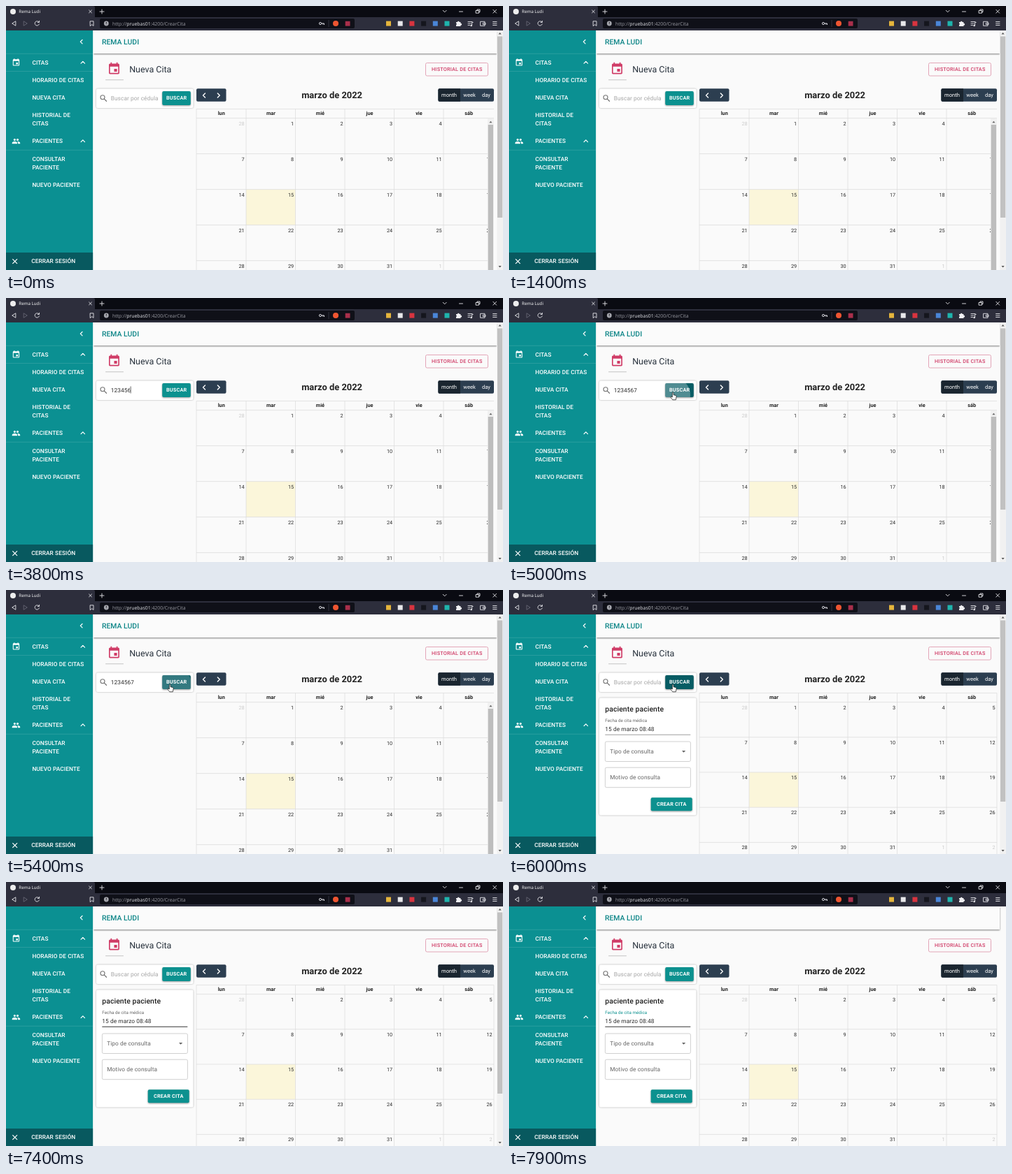
Recreate the animation shown at these times as an HTML page. Size 710 by 378 pixels, loop 8 s.

```html
<!DOCTYPE html>
<html lang="es">
<head>
<meta charset="utf-8">
<title>Rema Ludi</title>
<style>
html, body { margin: 0; width: 100%; height: 100%; overflow: hidden; background: #fafafa; }
svg { display: block; width: 100%; height: 100%; }
text { font-family: Roboto, sans-serif; text-rendering: geometricPrecision; white-space: pre; }
.body { font-size: 8.32px; letter-spacing: .078px; }
.btn { font-size: 7.28px; font-weight: 500; letter-spacing: .208px; }
.ui { font-family: "Open Sans", sans-serif; }
.tool { font-size: 7.6px; fill: #fff; text-anchor: middle; }
.head { font-size: 7.28px; font-weight: 700; fill: #222; text-anchor: middle; }
.num { font-size: 7.28px; fill: #2b2b2b; text-anchor: end; }
.other { fill: #cbcbcb; }
.line { fill: none; stroke-linecap: round; stroke-linejoin: round; }
.paper { fill: #fff; filter: drop-shadow(0 .8px .9px rgba(0,0,0,.32)); }
.raised { filter: drop-shadow(0 1px .9px rgba(0,0,0,.4)); }
#menu text { font-weight: 500; }

.anim { animation: 8s step-end infinite; }
#old { animation-name: before; }
#fresh, #card { animation-name: after; }
#hint { animation-name: hint; }
.typed { animation-name: typed; }
#pen { animation-name: pen; }
#caret { animation-name: caret; }
#search { animation-name: hover; animation-timing-function: linear; }
#ripple { animation-name: ripple; animation-timing-function: linear; transform-origin: 234px 139px; }
#hand { animation-name: hand; animation-timing-function: linear; }
#arrow { animation-name: arrow; animation-timing-function: linear; }
#rule { animation-name: rule; }
#label { animation-name: label; }
#scroll { animation-name: lock; }

@keyframes before { 0% { opacity: 1 } 68.75%, 100% { opacity: 0 } }
@keyframes after { 0% { opacity: 0 } 68.75%, 100% { opacity: 1 } }
@keyframes hint { 0% { opacity: 1 } 26.25% { opacity: 0 } 68.75%, 100% { opacity: 1 } }
@keyframes typed { 0% { opacity: 0 } 26.25% { opacity: 1 } 68.75%, 100% { opacity: 0 } }
@keyframes pen {
  0% { transform: translateX(0) }
  26.25% { transform: translateX(4.75px) }
  31.25% { transform: translateX(9.5px) }
  35% { transform: translateX(14.25px) }
  38.75% { transform: translateX(19px) }
  42.5% { transform: translateX(23.75px) }
  46.25% { transform: translateX(28.5px) }
  50%, 100% { transform: translateX(33.25px) }
}
@keyframes caret {
  0% { opacity: 0 } 18.75% { opacity: 1 } 25.4% { opacity: 0 }
  26.25% { opacity: 1 } 56.6%, 100% { opacity: 0 }
}
@keyframes hover { 0%, 58% { fill: #0c918f } 60.5%, 78% { fill: #075c64 } 81%, 100% { fill: #0c918f } }
@keyframes ripple {
  0%, 59% { transform: scale(0); opacity: .3; animation-timing-function: cubic-bezier(.4,0,.2,1) }
  65.9% { transform: scale(1); opacity: .3 }
  70%, 100% { transform: scale(1); opacity: 0 }
}
@keyframes hand {
  0%, 58.1% { opacity: 0; transform: translate(-9px,-4px) }
  58.12% { opacity: 1; transform: translate(-9px,-4px) }
  60.5%, 77.5% { opacity: 1; transform: none }
  78.1% { opacity: 1; transform: translate(-1px,5px) }
  78.12%, 100% { opacity: 0; transform: translate(-1px,5px) }
}
@keyframes arrow {
  0%, 78.1% { opacity: 0; transform: none }
  78.12% { opacity: 1; transform: none }
  81.2% { opacity: 1; transform: translate(-30px,50px) }
  81.22%, 100% { opacity: 0; transform: translate(-30px,50px) }
}
@keyframes rule { 0% { fill: #949494 } 81.25%, 100% { fill: #212121 } }
@keyframes label { 0% { fill: #666 } 97.5%, 100% { fill: #0c918f } }
@keyframes lock { 0% { opacity: 1 } 97.5%, 100% { opacity: 0 } }
</style>
</head>
<body>
<svg viewBox="0 0 710 378" preserveAspectRatio="none">
  <defs>
    <path id="event" d="M17 12h-5v5h5v-5zM16 1v2H8V1H6v2H5c-1.11 0-1.99.9-1.99 2L3 19c0 1.1.89 2 2 2h14c1.1 0 2-.9 2-2V5c0-1.1-.9-2-2-2h-1V1h-2zm3 18H5V8h14v11z"/>
    <path id="up" class="line" d="M-2.7 1.4L0-1.4L2.7 1.4" stroke="#fff" stroke-width="1.2"/>
    <clipPath id="inBtn"><rect x="223.2" y="122" width="40.6" height="20" rx="2"/></clipPath>
    <clipPath id="inBody"><rect x="271" y="147" width="417" height="231"/></clipPath>
  </defs>
  <rect width="710" height="378" fill="#fafafa"/>

  <!-- page heading -->
  <rect x="142" y="105.3" width="26" height="1" rx=".5" fill="#c4c4c4"/>
  <use href="#event" transform="translate(144.5 80) scale(.83)" fill="#d03c67"/>
  <text x="176.2" y="95.1" font-size="12.47" fill="#27313c">Nueva Cita</text>
  <rect x="599.5" y="81.5" width="89" height="18.5" rx="2" fill="none" stroke="#e3a6b8"/>
  <text class="btn" x="608" y="93.1" fill="#d03c67">HISTORIAL DE CITAS</text>

  <!-- patient search -->
  <rect class="paper" x="129" y="118.5" width="138.5" height="27.5" rx="2"/>
  <path class="line" d="M140.6 133.4L143.5 136.3" stroke="#757575" stroke-width="1.3"/>
  <circle cx="138" cy="130.8" r="3" fill="none" stroke="#757575" stroke-width="1.1"/>
  <text id="hint" class="body anim" x="149.7" y="134.5" fill="#a6a6a6">Buscar por cédula</text>
  <text class="body typed anim" x="149.7" y="134.5" fill="#2b2b2b">1234567</text>
  <g id="pen" class="anim">
    <rect class="typed anim" x="149.6" y="126" width="38" height="12" fill="#fff"/>
    <rect id="caret" class="anim" x="149.4" y="126.5" width=".7" height="10" fill="#222"/>
  </g>
  <rect id="search" class="raised anim" x="223.2" y="122" width="40.6" height="20" rx="2"/>
  <g clip-path="url(#inBtn)"><circle id="ripple" class="anim" cx="234" cy="139" r="32" fill="#fff"/></g>
  <text class="btn" x="229" y="134" fill="#fff" style="font-weight:700">BUSCAR</text>

  <!-- calendar -->
  <rect x="272" y="118.2" width="42.5" height="18.5" rx="2" fill="#2c3e50"/>
  <path class="line" d="M284.5 125L281.5 128L284.5 131M302.3 125L305.3 128L302.3 131" stroke="#fff" stroke-width="1.4"/>
  <text x="465.6" y="131.9" font-size="12.9" font-weight="700" fill="#222" text-anchor="middle">marzo de 2022</text>
  <rect x="617.4" y="118.2" width="79.6" height="18.5" rx="2" fill="#2c3e50"/>
  <path d="M619.4 118.2H649V136.7H619.4Q617.4 136.7 617.4 134.7V120.2Q617.4 118.2 619.4 118.2" fill="#1a252f"/>
  <text class="tool" x="633" y="130.1">month</text>
  <text class="tool" x="662" y="130.1">week</text>
  <text class="tool" x="686" y="130.1">day</text>
  <g id="heads"></g>
  <g id="old" class="anim">
    <g id="tall" clip-path="url(#inBody)"></g>
    <rect x="688" y="161" width="9" height="217" fill="#f1f1f1"/>
    <rect x="688.7" y="170" width="7.3" height="208" fill="#bdbdbd"/>
    <path d="M690.3 167.3L692.4 164.8L694.5 167.3Z" fill="#666"/>
  </g>
  <g id="fresh" class="anim"></g>

  <!-- appointment form -->
  <g id="card" class="anim">
    <rect class="paper" x="129" y="154.5" width="138.5" height="168" rx="2"/>
    <text x="137.3" y="174.2" font-size="10.4" font-weight="500" letter-spacing=".078" fill="#222">paciente paciente</text>
    <text id="label" class="anim" x="137.3" y="189" font-size="6.24" letter-spacing=".05">Fecha de cita médica</text>
    <text class="body" x="137.3" y="202.1" fill="#2b2b2b">15 de marzo 08:48</text>
    <rect id="rule" class="anim" x="137.3" y="206.8" width="122" height=".9"/>
    <g fill="none" stroke="#c4c4c4" stroke-width=".8">
      <rect x="137.4" y="217" width="122" height="28.5" rx="2"/>
      <rect x="137.4" y="254.2" width="122" height="28.5" rx="2"/>
    </g>
    <text class="body" x="144.2" y="233.9" fill="#666">Tipo de consulta</text>
    <path d="M247 230L252.2 230L249.6 232.7Z" fill="#666"/>
    <text class="body" x="144.2" y="271.1" fill="#666">Motivo de consulta</text>
    <rect class="raised" x="202.7" y="297.3" width="59" height="19" rx="2" fill="#0c918f"/>
    <text class="btn" x="211" y="309" fill="#fff" style="font-weight:700">CREAR CITA</text>
  </g>

  <!-- app bar, page scrollbar -->
  <rect x="125" y="35" width="576" height="33" fill="#fbfbfb" style="filter:drop-shadow(0 1px 1.3px rgba(0,0,0,.5))"/>
  <text x="137" y="55" font-size="10.4" font-weight="500" fill="#0c8587">REMA LUDI</text>
  <g id="scroll" class="anim">
    <rect x="701.3" y="35" width="9" height="343" fill="#f1f1f1"/>
    <rect x="702" y="43.5" width="7.2" height="259.5" fill="#c1c1c1"/>
    <path d="M703.5 40.5L705.6 38L707.7 40.5ZM703.5 372L705.6 374.5L707.7 372Z" fill="#555"/>
  </g>

  <!-- sidebar -->
  <rect x="124" y="35" width="1.2" height="343" fill="#f4f6f6"/>
  <rect y="35" width="124.1" height="343" fill="#0b9092"/>
  <path d="M0 68.3H124M0 93.5H124M0 206.3H124" stroke="#fff" stroke-opacity=".17" stroke-width=".7"/>
  <rect y="353" width="124.1" height="25" fill="#08595f"/>
  <path class="line" d="M109 48.5L106.3 51.2L109 53.9M9.7 362.7L15.7 368.7M15.7 362.7L9.7 368.7" stroke="#fff" stroke-width="1.2"/>
  <use href="#event" transform="translate(8.2 74.7) scale(.52)" fill="#fff"/>
  <path transform="translate(8.2 187.3) scale(.52)" fill="#fff" d="M16 11c1.66 0 2.99-1.34 2.99-3S17.66 5 16 5s-3 1.34-3 3 1.34 3 3 3zm-8 0c1.66 0 2.99-1.34 2.99-3S9.66 5 8 5 5 6.34 5 8s1.34 3 3 3zm0 2c-2.33 0-7 1.17-7 3.5V19h14v-2.5c0-2.33-4.67-3.5-7-3.5zm8 0c-.29 0-.62.02-.97.05 1.16.84 1.97 1.97 1.97 3.45V19h6v-2.5c0-2.33-4.67-3.5-7-3.5z"/>
  <use href="#up" x="109.8" y="80.8"/>
  <use href="#up" x="109.8" y="193.2"/>
  <g id="menu" fill="#fff"></g>

  <!-- browser -->
  <rect width="710" height="16" fill="#0a0b12"/>
  <path d="M0 0H125Q127 0 127 2V16H0Z" fill="#2d2e3c"/>
  <rect y="16" width="710" height="19" fill="#2d2e3c"/>
  <circle cx="10" cy="8" r="4" fill="#eee"/>
  <text class="ui" x="18.3" y="10" font-size="6.24" fill="#fff">Rema Ludi</text>
  <g class="line" stroke="#e6e6ea" stroke-width=".9">
    <path d="M118.6 6L122.4 9.8M122.4 6L118.6 9.8M134 8H140M137 5V11"/>
    <path d="M624.2 6.3L626.7 8.8L629.2 6.3M647.5 8H652.5M671.5 6.5H675.5V10.2H671.5ZM673 6.5V5H677V8.7H675.5M695.8 5.3L700.6 10.1M700.6 5.3L695.8 10.1"/>
    <path d="M13.5 22L8.7 25L13.5 28Z"/>
    <path d="M25.5 22L30.3 25L25.5 28Z" stroke="#666774"/>
    <path d="M47 23A3.2 3.2 0 1 0 47.4 26M47.5 21.3V23.4H45.2"/>
    <path d="M120.5 21.8H125V28.4L122.7 26.6L120.5 28.4Z"/>
  </g>
  <rect x="134" y="18" width="364" height="14" rx="2" fill="#0f1018"/>
  <circle cx="143.3" cy="25" r="3.4" fill="#a5a6ad"/>
  <path d="M143.3 23V25.3M143.3 26.7V27" stroke="#0c0d14" stroke-width=".9"/>
  <text class="ui" x="152" y="27.5" font-size="6.9" fill="#9a9ba3">http://<tspan fill="#e4e5ea">pruebas01</tspan>:4200/CrearCita</text>
  <path class="line" d="M450.3 25H454.5V26.6M452.8 25V26.2" stroke="#d0d0d6"/>
  <circle cx="449" cy="25" r="1.6" fill="none" stroke="#d0d0d6"/>
  <path d="M461 20V30" stroke="#3c3d49" stroke-width=".8"/>
  <circle cx="471" cy="25" r="4" fill="#ee5531"/>
  <rect x="484.7" y="21.8" width="6.8" height="6.8" fill="#a92f4b"/>
  <g id="addons"></g>
  <path d="M643 23H645A1.3 1.3 0 1 1 647.6 23H649.5V25A1.3 1.3 0 1 1 649.5 27.5V29H643V27A1.3 1.3 0 0 0 643 24.6Z" fill="#f0f0f3"/>
  <path class="line" d="M660 22.5H666M660 25H664M660 27.5H662.5M665.6 28V23.5H667.2M678 22.3H684V28.3H678ZM681.7 24.3H685V26.5H681.7ZM695.6 22.5H701M695.6 25H701M695.6 27.5H701" stroke="#e6e6ea" stroke-width=".9"/>
  <circle cx="664.6" cy="28" r="1.2" fill="#e6e6ea"/>

  <!-- pointers -->
  <path id="hand" class="anim" d="M233.3 135.5Q234.2 134.3 235 135.5V138.7L238.2 139.5Q239.3 139.9 239.1 141.2L238.3 145.8H233.8L231.1 142.3Q230.6 141 231.8 141L233.3 142Z" fill="#fff" stroke="#111" stroke-width=".7"/>
  <path id="arrow" class="anim" d="M232 142V151.5L234.2 149.5L235.7 152.8L237.1 152.2L235.7 149H238.7Z" fill="#fff" stroke="#111" stroke-width=".6"/>
</svg>
<script>
const NS = "http://www.w3.org/2000/svg";
const cols = [272, 343, 413.5, 484, 554.5, 625, 697];
const top0 = 160.6;

function add(parent, tag, attrs, label) {
  const el = document.createElementNS(NS, tag);
  for (const k in attrs) el.setAttribute(k, attrs[k]);
  if (label) el.textContent = label;
  document.getElementById(parent).append(el);
}

function month(id, step) {
  add(id, "rect", { x: cols[1], y: top0 + 2 * step, width: 70.5, height: step, fill: "#fbf6da" });
  let grid = "";
  for (let r = 1; r < 5; r++) grid += `M272 ${top0 + r * step}H697`;
  for (const x of cols) grid += `M${x} 147.5V378`;
  add(id, "path", { d: grid, stroke: "#dadada", "stroke-width": .7 });
  for (let r = 0; r < 5; r++) {
    for (let c = 0; c < 6; c++) {
      const day = new Date(2022, 1, 28 + r * 7 + c);
      const cls = day.getMonth() === 2 ? "num" : "num other";
      add(id, "text", { class: cls, x: cols[c + 1] - 2.3, y: 170.5 + r * step }, String(day.getDate()));
    }
  }
}

["lun", "mar", "mié", "jue", "vie", "sáb"].forEach((d, i) =>
  add("heads", "text", { class: "head", x: (cols[i] + cols[i + 1]) / 2 + .2, y: 156.4 }, d));
add("heads", "path", { d: `M272 147.5H697M272 ${top0}H697`, stroke: "#dadada", "stroke-width": .7 });
month("tall", 51);
month("fresh", 50.2);

[["CITAS", 83.6], ["HORARIO DE CITAS", 108.9], ["NUEVA CITA", 133.9], ["HISTORIAL DE", 158.8], ["CITAS", 171.3],
 ["PACIENTES", 196.1], ["CONSULTAR", 221.5], ["PACIENTE", 234], ["NUEVO PACIENTE", 259], ["CERRAR SESIÓN", 368.1]]
  .forEach(([name, y]) => add("menu", "text", { class: "body", x: y > 300 ? 36.2 : 37.4, y }, name));

["#e5b53c", "#e8e8ea", "#d8343f", "#15161d", "#4a86d8", "#1fb5ad"].forEach((fill, i) =>
  add("addons", "rect", { x: 543 + i * 16.7, y: 21.6, width: 7, height: 7, fill }));
</script>
</body>
</html>
```
